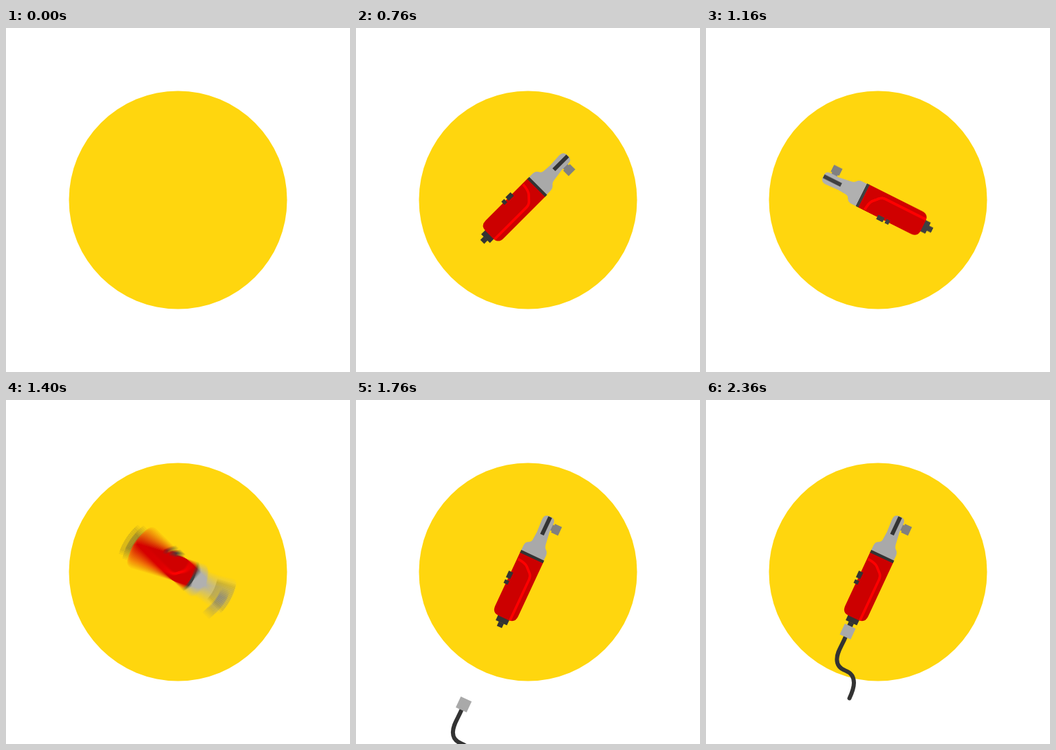
Animation, 500 px wide and 500 px high, one loop 2.76 s. Source, as an HTML page with a canvas:

```html
<!DOCTYPE html>
<html lang="en">
<head>
<meta charset="utf-8">
<title>Air ratchet</title>
<style>
  html, body { margin: 0; width: 100%; height: 100%; overflow: hidden; background: #fff; }
  canvas { display: block; }
</style>
</head>
<body>
<canvas id="stage" width="500" height="500"></canvas>
<script>
const LOOP = 2760, STEP = 40, SIZE = 500;
const REST = 25, WINDUP = -65;
const DARK = '#333', GREY = '#a9a9a9', STEEL = '#808080';
const ctx = document.getElementById('stage').getContext('2d');
const rad = deg => deg * Math.PI / 180;
const mix = (a, b, k) => a + (b - a) * k;
const span = (t, from, to) => Math.min(1, Math.max(0, (t - from) / (to - from)));
const easeOut = (k, power = 2) => 1 - (1 - k) ** power;
const smooth = k => k * k * (3 - 2 * k);

// Ease curve with flat ends; x1 and x2 are the horizontal handles.
function bezierEase(k, x1, x2) {
  let lo = 0, hi = 1;
  for (let i = 0; i < 24; i++) {
    const s = (lo + hi) / 2, r = 1 - s;
    if (3 * x1 * s * r * r + 3 * x2 * s * s * r + s ** 3 < k) lo = s; else hi = s;
  }
  return smooth(lo);
}

const HEAD = new Path2D(`M-22.3 -24 V-32 Q-22.3 -38 -17.5 -40 Q-14 -41.5 -13.6 -46 L-12.8 -58
  L-13.8 -78 Q-13.8 -86.5 -6 -86.5 H-3 Q4 -86.5 4 -79 L3.8 -66 L6.4 -48
  Q7 -42 11 -39.5 Q13.7 -37 13.7 -33 V-24 Z`);
const BODY = new Path2D('M-22.5 -22 H14.3 V64.5 Q14.3 75.5 3.3 75.5 H-11.5 Q-22.5 75.5 -22.5 64.5 Z');
const SHINE = new Path2D('M-21 -11 Q-9 -10 -5 -6.5 L3 1 Q6 4 6 9 V75');
const HOSE = new Path2D(`M202.5 345 C197 358 190.3 366 190.3 377 C190.3 386 196 391 203 393.5
  C212 397 215 404 215 411 C215 419 212 426 208.5 433.5`);

function box(g, color, x1, y1, x2, y2) {
  g.fillStyle = color;
  g.fillRect(x1, y1, x2 - x1, y2 - y1);
}

function drawTool(g) {
  box(g, STEEL, 2, -77.5, 8, -68.5);
  box(g, STEEL, 6, -80, 17.2, -66.3);
  g.fillStyle = GREY;
  g.fill(HEAD);
  box(g, DARK, -7.4, -86, -1.6, -57.7);
  box(g, DARK, -13, 74, 5, 83.3);
  box(g, DARK, -8, 83, 0, 90);
  g.fillStyle = '#c00';
  g.fill(BODY);
  g.strokeStyle = '#f00';
  g.lineWidth = 3.6;
  g.stroke(SHINE);
  box(g, DARK, -22.5, -25, 14.3, -20.8);
  box(g, DARK, -26, 10, -19, 20.3);
  box(g, DARK, -25.6, 23.5, -19, 29.3);
}

function makeLayer(size) {
  const canvas = document.createElement('canvas');
  canvas.width = canvas.height = size;
  return canvas.getContext('2d');
}

const sprite = makeLayer(400);
sprite.translate(200, 200);
sprite.scale(2, 2);
drawTool(sprite);
const blur = makeLayer(SIZE);

function toolPose(t) {
  const x = mix(-70, 250, easeOut(span(t, 520, 760)));
  const angle = t < 1120
    ? mix(45, WINDUP, smooth(span(t, 760, 1040)))
    : mix(WINDUP, REST + 360, bezierEase(span(t, 1120, 1680), 0.71, 0.37));
  return { x, angle };
}

function place(g, { x, angle }) {
  g.setTransform(1, 0, 0, 1, x, 250);
  g.rotate(rad(angle));
}

function drawMovingTool(t) {
  const shutter = 13, samples = 16;
  const a = toolPose(t - shutter / 2), b = toolPose(t + shutter / 2);
  if (Math.abs(a.angle - b.angle) + Math.abs(a.x - b.x) < 0.8) {
    ctx.save();
    place(ctx, toolPose(t));
    drawTool(ctx);
    ctx.restore();
    return;
  }
  blur.setTransform(1, 0, 0, 1, 0, 0);
  blur.clearRect(0, 0, SIZE, SIZE);
  blur.globalCompositeOperation = 'lighter';
  blur.globalAlpha = 1 / samples;
  for (let i = 0; i < samples; i++) {
    place(blur, toolPose(t + shutter * ((i + 0.5) / samples - 0.5)));
    blur.drawImage(sprite.canvas, -100, -100, 200, 200);
  }
  ctx.drawImage(blur.canvas, 0, 0);
}

function drawHose(t) {
  const gap = mix(194, 18, easeOut(span(t, 1680, 2000))) - 18 * smooth(span(t, 2040, 2160));
  ctx.save();
  ctx.translate(-gap * Math.sin(rad(REST)), gap * Math.cos(rad(REST)));
  ctx.strokeStyle = DARK;
  ctx.lineWidth = 6;
  ctx.lineCap = 'round';
  ctx.stroke(HOSE);
  ctx.translate(206, 336.5);
  ctx.rotate(rad(REST));
  box(ctx, GREY, -8.7, -8.7, 8.7, 8.7);
  ctx.restore();
}

function drawSparks(t) {
  const k = span(t, 2160, 2360);
  if (k === 0 || k === 1) return;
  const inner = 20 + 38 * k, outer = 20 + 39 * easeOut(k, 4);
  ctx.strokeStyle = '#fff';
  ctx.lineWidth = 3;
  ctx.beginPath();
  for (const side of [0, 180]) {
    for (const fan of [-30, 0, 30]) {
      const a = rad(REST + side + fan);
      ctx.moveTo(215 + inner * Math.cos(a), 325.5 + inner * Math.sin(a));
      ctx.lineTo(215 + outer * Math.cos(a), 325.5 + outer * Math.sin(a));
    }
  }
  ctx.stroke();
}

function draw(t) {
  box(ctx, '#fff', 0, 0, SIZE, SIZE);
  ctx.fillStyle = '#ffd60e';
  ctx.beginPath();
  ctx.arc(250, 250, 158.5, 0, 2 * Math.PI);
  ctx.fill();
  if (t >= 560) drawMovingTool(t);
  if (t >= 1720) drawHose(t);
  drawSparks(t);
}

// The motion advances in steps of 40 ms.
function tick() {
  draw(Math.floor(performance.now() % LOOP / STEP) * STEP);
  requestAnimationFrame(tick);
}
tick();
</script>
</body>
</html>
```
